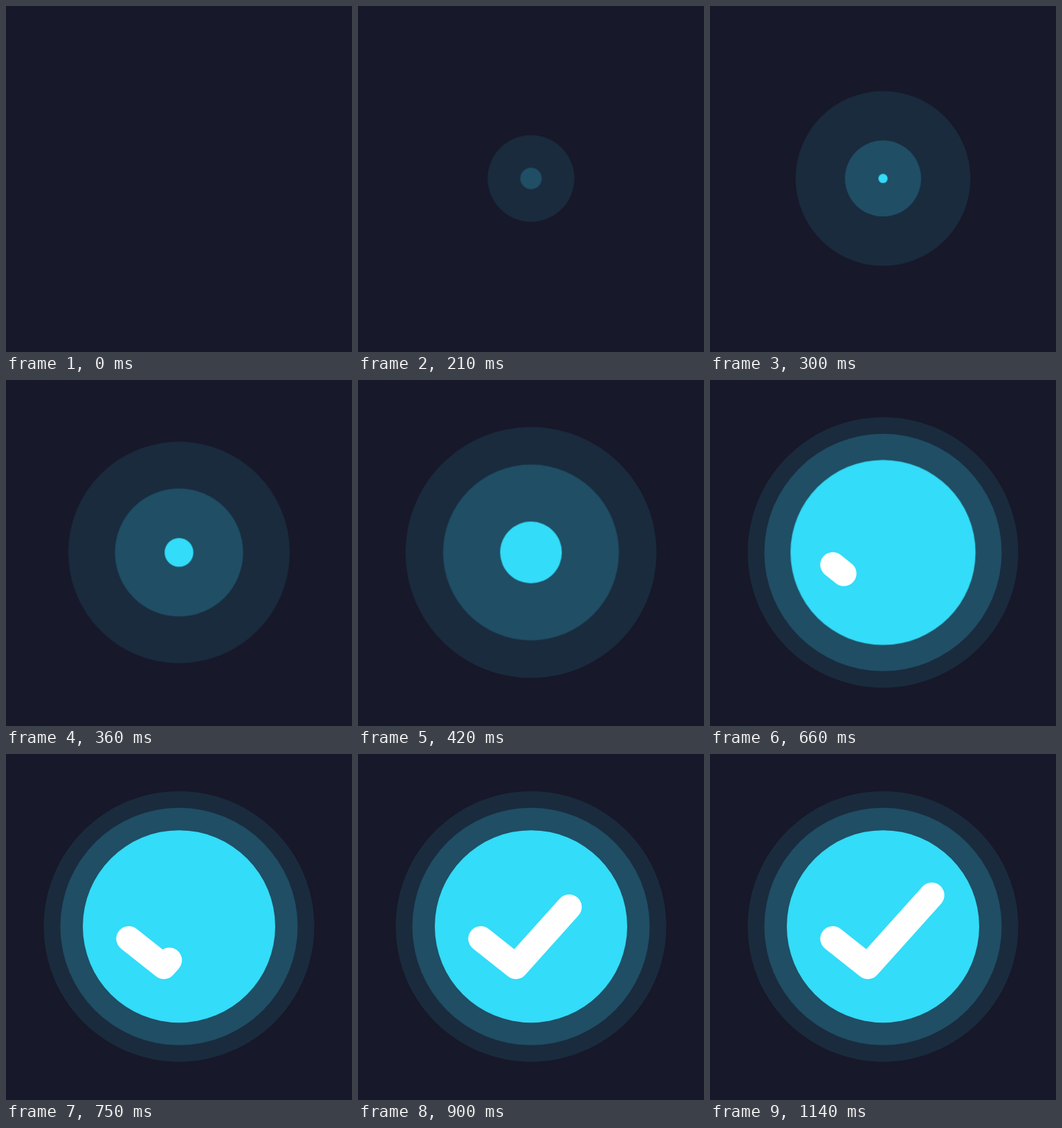
An HTML page for the animation above (4.14 s loop, 500 by 500 pixels).

```html
<!DOCTYPE html>
<html lang="en">
<head>
<meta charset="utf-8">
<title>Check mark</title>
<style>
  html, body { margin: 0; height: 100%; overflow: hidden; background: #171829; }
  svg { display: block; width: 100vw; height: 100vh; }
  circle, path {
    animation: grow 540ms cubic-bezier(.478, 0, .469, 1) both paused;
  }
  circle { transform-origin: 250px 249.2px; }
  .halo { fill: #1a2b3e; }
  .ring { fill: #204e64; animation-delay: 90ms; }
  .disc { fill: #33dcf8; animation-delay: 210ms; }
  path {
    fill: none;
    stroke: #fff;
    stroke-width: 36.4;
    stroke-linecap: round;
    stroke-linejoin: round;
    animation-name: draw;
    animation-duration: 485ms;
    animation-delay: 547ms;
  }
  @keyframes grow { from { transform: scale(0); } to { transform: scale(1); } }
  @keyframes draw {
    from { stroke-dasharray: 0 2; visibility: hidden; }
    to { stroke-dasharray: 1 2; visibility: visible; }
  }
</style>
</head>
<body>
<svg viewBox="0 0 500 500">
  <circle class="halo" cx="250" cy="249.2" r="195.5"/>
  <circle class="ring" cx="250" cy="249.2" r="171.5"/>
  <circle class="disc" cx="250" cy="249.2" r="139"/>
  <path pathLength="1" d="M177.5 267 L228 307 L320.5 204"/>
</svg>
<script>
  const LOOP = 4140, STEP = 30, FIRST = 60;
  const start = performance.now();
  const parts = document.getAnimations();

  // Hold each pose for one step; the stage stays empty until FIRST.
  function show() {
    const time = (performance.now() - start) % LOOP;
    const held = Math.floor((time + 0.5) / STEP) * STEP;
    for (const part of parts) part.currentTime = held < FIRST ? 0 : held;
    requestAnimationFrame(show);
  }
  show();
</script>
</body>
</html>
```
